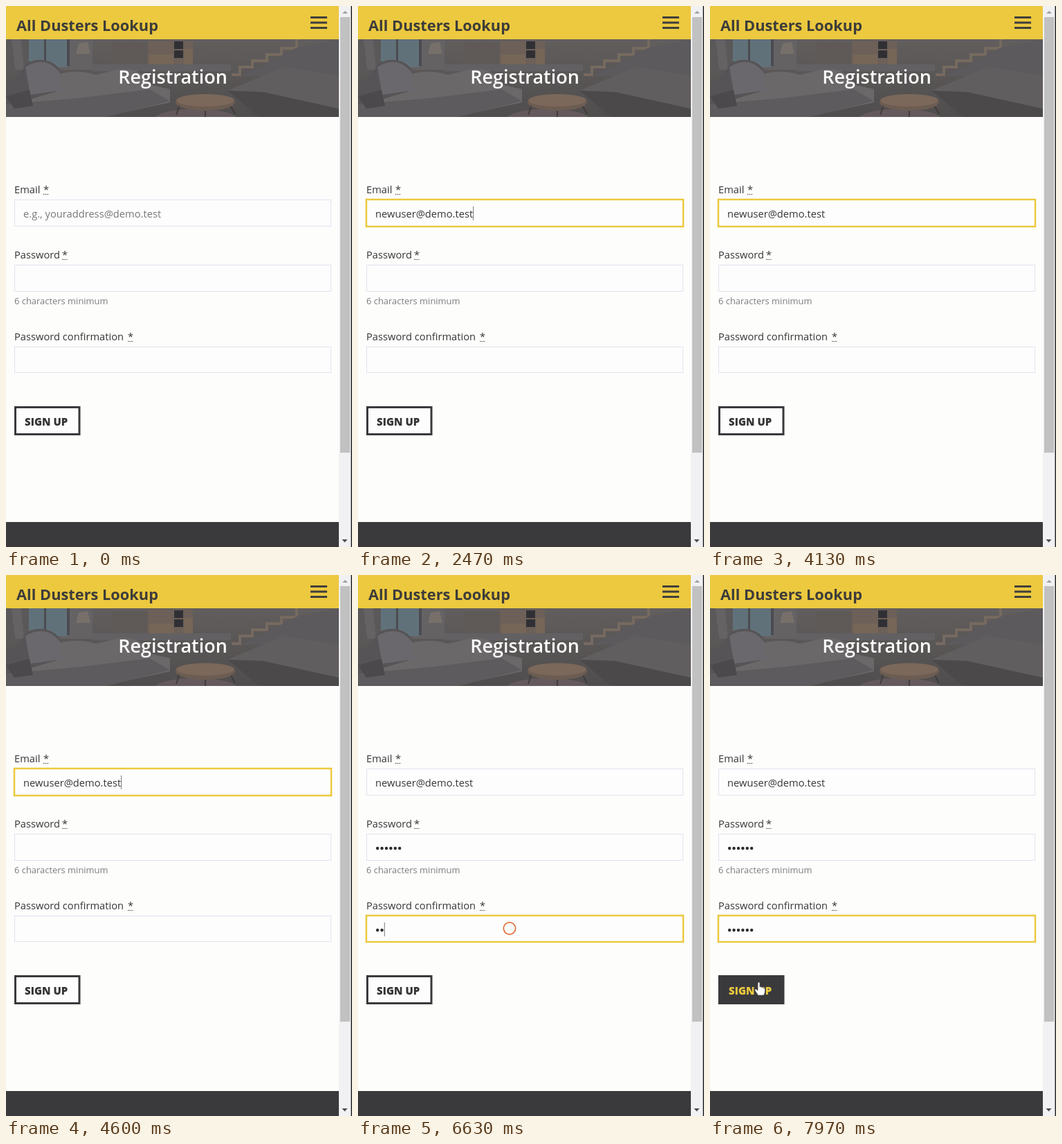
An HTML page for the animation above (8 s loop, 500x780 px).

```html
<!DOCTYPE html>
<html lang="en">
<head>
<meta charset="utf-8">
<title>Registration</title>
<style>
html, body { margin: 0; width: 100%; height: 100%; overflow: hidden; background: #fdfdfc; }
svg { display: block; width: 500px; height: 780px; font-family: "Open Sans", "Noto Sans", sans-serif; }
text { fill: #363638; font-size: 14.7px; white-space: pre; }
.brand { font-size: 21.8px; font-weight: 700; fill: #3d3c3a; }
.title { font-size: 27px; font-weight: 600; fill: #fdfdfd; text-anchor: middle; }
.soft { fill: #77777a; }
.hint { font-size: 12.95px; fill: #7c7c80; }
.action { font-size: 15px; font-weight: 800; }
</style>
</head>
<body>
<svg id="stage" viewBox="0 0 500 780">
  <defs>
    <clipPath id="bannerClip"><rect y="48" width="481" height="112"/></clipPath>
    <linearGradient id="wall" x2="0" y2="1">
      <stop offset="0" stop-color="#625e5d"/><stop offset="1" stop-color="#504d4e"/>
    </linearGradient>
  </defs>
  <rect width="500" height="780" fill="#fdfdfc"/>

  <g clip-path="url(#bannerClip)">
    <rect y="48" width="481" height="112" fill="url(#wall)"/>
    <path d="M0 48H125V92H0Z" fill="#656264"/>
    <path d="M33 48H90V88H33Z" fill="#61717a"/>
    <path d="M0 48H8L14 98H0ZM22 48H33V92H26Z" fill="#5a5859"/>
    <path d="M55 48H58V85H55ZM88 48H92V87H88Z" fill="#4b4c50"/>
    <path d="M105 54L118 52L122 69H101Z" fill="#77706a"/>
    <path d="M152 52H205V84H152Z" fill="#5f5a58"/>
    <path d="M205 50H270V89H205Z" fill="#6c6058"/>
    <path d="M207 70H242V88H207ZM257 62H270V87H257Z" fill="#766658"/>
    <path d="M243 51H256V62H243ZM243 64H256V75H243Z" fill="#303034"/>
    <path d="M125 84H325V94H125Z" fill="#626062"/>
    <path d="M420 48V61H398V70H377V79H356V88H338V99H326" fill="none" stroke="#766a60" stroke-width="4"/>
    <path d="M420 60L481 48V100L340 101Z" fill="#5c5a5c"/>
    <path d="M320 122L402 88L481 100V160H365Z" fill="#615e60"/>
    <path d="M320 122L365 160H481V148L372 124Z" fill="#4c494b"/>
    <path d="M0 112Q18 104 30 82Q58 70 77 90Q88 110 84 132L30 150L0 142Z" fill="#565456"/>
    <path d="M28 88Q57 70 78 96L84 121L35 128Z" fill="#6a686c"/>
    <path d="M76 98Q104 91 130 99L164 91Q196 88 207 113L237 120V139L139 160H0V145L83 120Z" fill="#6b686a"/>
    <path d="M0 142L112 132L207 120L237 137L145 160H0Z" fill="#5e5b5e"/>
    <path d="M0 130L34 121L39 144L12 148Z" fill="#4b494c"/>
    <path d="M215 160Q235 147 285 149Q323 151 333 160Z" fill="#645a5e"/>
    <path d="M252 139L246 157M288 149V160M322 139L331 156" stroke="#403c3c" stroke-width="2"/>
    <ellipse cx="288" cy="139" rx="43" ry="12" fill="#6c5c52"/>
    <ellipse cx="288" cy="136" rx="42" ry="9" fill="#7b685a"/>
  </g>
  <text class="title" x="241" y="112">Registration</text>

  <rect width="481" height="48" fill="#ecc93f"/>
  <text class="brand" x="15" y="36">All Dusters Lookup</text>
  <path d="M440 16.5H464M440 24H464M440 31.5H464" stroke="#403f3c" stroke-width="3"/>

  <g id="fields"></g>
  <text class="hint" x="12" y="430">6 characters minimum</text>

  <rect id="button" x="13.5" y="578.5" width="92.5" height="39" stroke="#3a3a3d" stroke-width="3"/>
  <text id="buttonText" class="action" x="27" y="605">SIGN UP</text>
  <rect y="744" width="481" height="36" fill="#3a3a3d"/>

  <rect x="481" width="17" height="780" fill="#f1f1f3"/>
  <rect x="483" y="16" width="14" height="628" fill="#c1c1c2"/>
  <path d="M486 11L490 7L494 11Z" fill="#a3a3a5"/>
  <path d="M485.5 769L489.5 773.5L493.5 769Z" fill="#505052"/>
  <rect x="498.5" width="1.5" height="780" fill="#222224"/>

  <rect id="caret" width="1" height="20" fill="#77777a"/>
  <circle id="ripple" r="8.6" fill="none" stroke="#e0703c" stroke-width="1.7"/>
  <path id="hand" d="M-1.5 1Q0-1 1.5 1V7Q3 5.5 4 7.5Q6 6.5 6.5 8.5Q9 7.5 9 10V14Q8.5 17 7 19H-1L-5 13Q-7 10-4 10L-1.5 12Z"
    fill="#fdfdfd" stroke="#3a3a3d" stroke-width=".7"/>
</svg>
<script>
const LOOP = 8000, BLINK = 530, TEXT_X = 25, DOT_STEP = 6.4;
const HOVER_AT = 7500, INK = "#363638", DARK = "#3a3a3d", YELLOW = "#ecc93f";
const $ = id => document.getElementById(id);

function set(node, attrs) {
  for (const key in attrs) node.setAttribute(key, attrs[key]);
}

function add(parent, tag, attrs, content = "") {
  const node = document.createElementNS("http://www.w3.org/2000/svg", tag);
  set(node, attrs);
  node.textContent = content;
  return parent.appendChild(node);
}

const show = (node, visible) => node.setAttribute("visibility", visible ? "visible" : "hidden");

const fields = [
  { label: "Email", starX: 54, y: 279, h: 39, click: 1220, type: 1400, step: 62, value: "newuser@demo.test" },
  { label: "Password", starX: 81, y: 373, h: 39, click: 4700, type: 5000, step: 130, dots: 6 },
  { label: "Password confirmation", starX: 176, y: 491, h: 38, click: 6250, type: 6480, step: 120, dots: 6 }
];

for (const field of fields) {
  const group = add($("fields"), "g", {});
  const { y, starX } = field;
  add(group, "text", { x: 12, y: y - 9 }, field.label);
  add(group, "text", { x: starX, y: y - 9 }, "*");
  add(group, "path", { d: `M${starX} ${y - 7.5}h8`, stroke: "#48484a", "stroke-dasharray": "1.5 1" });
  field.box = add(group, "rect", { fill: "#fdfdfd" });
  if (field.value) {
    field.placeholder = add(group, "text", { class: "soft", x: TEXT_X, y: y + 26 }, "e.g., youraddress@demo.test");
    field.text = add(group, "text", { x: TEXT_X, y: y + 26 });
  } else {
    field.marks = Array.from({ length: field.dots }, (_, i) =>
      add(group, "circle", { cx: TEXT_X + 3.2 + i * DOT_STEP, cy: y + 21, r: 2.2, fill: "#2c2c2e" }));
  }
}

function drawField(field, time, focused) {
  const { y, h, value, dots, type, step } = field;
  const total = value ? value.length : dots;
  const count = Math.max(0, Math.min(total, Math.floor((time - type) / step) + 1));
  set(field.box, focused
    ? { x: 12, y, width: 458, height: h, stroke: YELLOW, "stroke-width": 2.5 }
    : { x: 12.5, y: y + .5, width: 457, height: h - 1, stroke: "#e2e2ef", "stroke-width": 1 });

  if (value) {
    field.text.textContent = value.slice(0, count);
    show(field.placeholder, !count);
  } else {
    field.marks.forEach((mark, i) => show(mark, i < count));
  }
  if (!focused) return;

  const lastKey = count ? type + (count - 1) * step : field.click;
  const width = value ? (count ? field.text.getComputedTextLength() : 0) : count * DOT_STEP;
  set($("caret"), { x: TEXT_X + width, y: y + 10 });
  show($("caret"), Math.floor((time - lastKey) / BLINK) % 2 === 0);
}

function render(time) {
  const active = fields.filter(field => time >= field.click).pop();
  show($("caret"), false);
  fields.forEach(field => drawField(field, time, field === active));

  show($("ripple"), active && time < active.click + 420);
  if (active) set($("ripple"), { cx: 219, cy: active.y + 18.5 });

  const hover = time >= HOVER_AT;
  set($("button"), { fill: hover ? DARK : "#fdfdfd" });
  $("buttonText").style.fill = hover ? YELLOW : INK;
  show($("hand"), hover);
  const progress = Math.min(1, Math.max(0, (time - HOVER_AT) / 250));
  const arrive = 1 - (1 - progress) ** 3;
  set($("hand"), { transform: `translate(${91 - 20.5 * arrive} ${578 + 9 * arrive})` });
}

const start = performance.now();
function tick() {
  render((performance.now() - start) % LOOP);
  requestAnimationFrame(tick);
}
tick();
</script>
</body>
</html>
```
